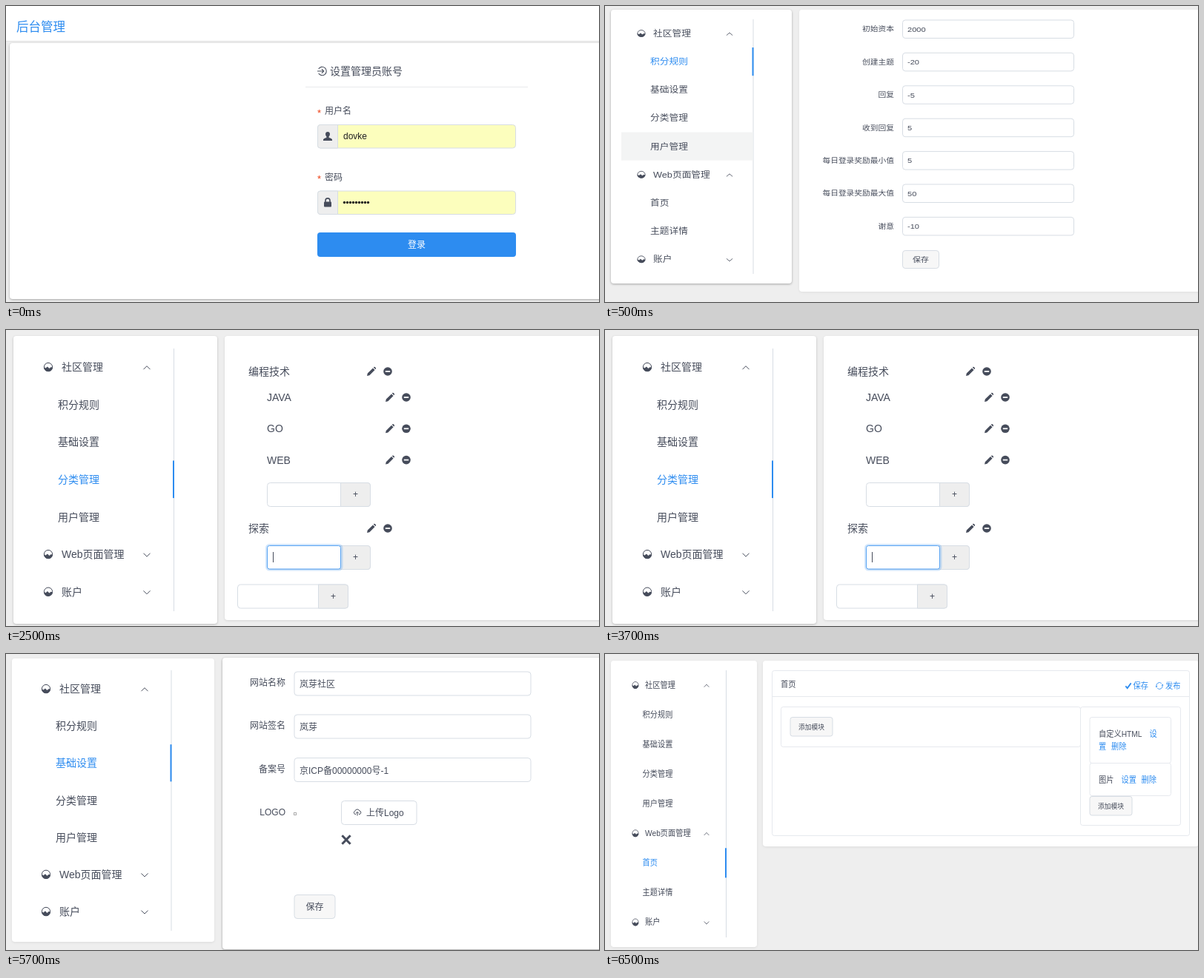
These frames come from a looping animation (800x400 px, 8 s). An HTML page:

```html
<!DOCTYPE html>
<html lang="zh">
<head>
<meta charset="utf-8">
<title>后台管理</title>
<style>
html, body { margin: 0; width: 100%; height: 100%; overflow: hidden; background: #eee; }
svg { display: block; width: 100vw; height: 100vh; }
text { font-family: "Liberation Sans", "Noto Sans CJK SC", "Noto Sans CJK", sans-serif; white-space: pre; }
</style>
</head>
<body>
<svg id="stage" viewBox="0 0 800 400"></svg>
<script>
const BLUE = '#2d8cf0', INK = '#464c5b', EDGE = '#d7dde4', SOFT = '#e6e9ee';

// Drawing kit; kx and ky are the page zoom of a scene.
function kit(kx = 1, ky = 1) {
  const at = (x, y, body) => `<g transform="translate(${x} ${y}) scale(${kx} ${ky})">${body}</g>`;

  const text = (x, y, str, o = {}) => at(x, y,
    `<text y="${(o.size || 14) * 0.365}" font-size="${o.size || 14}" fill="${o.fill || INK}"` +
    ` text-anchor="${o.anchor || 'start'}" font-weight="${o.weight || 400}">${str}</text>`);

  const rect = (x1, y1, x2, y2, fill, extra = '') =>
    `<rect x="${x1}" y="${y1}" width="${x2 - x1}" height="${y2 - y1}" fill="${fill}" ${extra}/>`;

  const box = (x1, y1, x2, y2, fill = '#fff', stroke = EDGE, r = 4) =>
    rect(x1 + .5, y1 + .5, x2 - .5, y2 - .5, fill, `rx="${r * kx}" stroke="${stroke}"`);

  const card = (x1, y1, x2, y2, shade = .2) => rect(x1, y1, x2, y2, '#fff',
    `rx="4" style="filter:drop-shadow(0 1px 1.5px rgba(0,0,0,${shade}))"`);

  const button = (x1, y1, x2, y2, str, fill = '#f7f7f7') => box(x1, y1, x2, y2, fill) +
    text((x1 + x2) / 2, (y1 + y2) / 2, str, { size: 12, anchor: 'middle' });

  const icon = (x, y, name) => at(x, y, icons[name]);

  // Side menu: rows are [label, kind], kind being 'up', 'down', 'on', 'hover' or ''.
  function menu(m) {
    let out = rect(m.line, m.top, m.line + 1, m.bottom, EDGE);
    m.rows.forEach(([label, kind], i) => {
      const y = m.y + i * m.step;
      if (kind === 'up' || kind === 'down') {
        out += icon(m.icon, y, 'gauge') + text(m.head, y, label) + icon(m.arrow, y + .7, kind);
        return;
      }
      if (kind === 'hover') out += rect(22, y - m.step / 2, m.line, y + m.step / 2, '#f3f4f4');
      if (kind === 'on') out += rect(m.line - 1, y - m.step / 2, m.line + 1, y + m.step / 2, BLUE);
      out += text(m.item, y, label, { fill: kind === 'on' ? BLUE : INK });
    });
    return out;
  }
  return { text, rect, box, card, button, icon, menu };
}

const stroke = (d, color = INK, w = 1) =>
  `<path d="${d}" fill="none" stroke="${color}" stroke-width="${w}"/>`;
const solid = (d, color = INK) => `<path d="${d}" fill="${color}"/>`;

const icons = {
  gauge: `<circle r="5.6" fill="#fff" stroke="${INK}"/>` +
    solid('M-6 0L-3.6 1.6L-1 -.6L1.4 2L3.4 .2L6 .6A6 6 0 0 1 -6 0Z'),
  up: stroke('M-4.5 2.5L0 -2L4.5 2.5'),
  down: stroke('M-4.5 -2L0 2.5L4.5 -2'),
  enter: stroke('M-4.8 -3A5.7 5.7 0 1 1 -4.8 3M-6.5 0H2M-.6 -2.8L2.2 0L-.6 2.8', INK, 1.1),
  user: solid('M-6 6V4.2Q-5.5 3 -1.6 1.8V.6Q-3 -1 -3 -3Q-2.8 -6 0 -6T3 -3Q3 -1 1.6 .6V1.8Q5.5 3 6 4.2V6Z'),
  lock: stroke('M-3 0V-2.6A3 3 0 0 1 3 -2.6V0', INK, 1.6) +
    `<rect x="-5" y="-1" width="10" height="7" rx="1" fill="${INK}"/>`,
  pencil: solid('M-6 6L-5.2 2.6L2 -4.6L4.6 -2L-2.6 5.2ZM2.8 -5.4L3.8 -6.2Q4.4 -6.4 6 -4.8Q6.4 -4.2 5.4 -2.8Z'),
  minus: `<circle r="5.8" fill="${INK}"/><path d="M-3.2 0H3.2" stroke="#fff" stroke-width="1.8"/>`,
  cloud: stroke('M-2 2.5H-3A2.3 2.3 0 0 1 -3.2 -1.8A3.3 3.3 0 0 1 3 -2A2.3 2.3 0 0 1 3 2.5H2M0 4.5V-.5M-1.8 1.2L0 -.6L1.8 1.2'),
  cross: stroke('M-5.6 -5.8L5.6 5.8M5.6 -5.8L-5.6 5.8', INK, 3),
  check: stroke('M-5 .5L-1.8 4L5 -4.5', BLUE, 2.4),
  sync: stroke('M-5.6 1A5.6 5.6 0 0 1 3.8 -4M5.6 -1A5.6 5.6 0 0 1 -3.8 4', BLUE, 1.1) +
    solid('M-7.4 .6H-3.6L-5.6 3ZM7.4 -.6H3.6L5.6 -3Z', BLUE)
};

function login() {
  const k = kit();
  const field = (y, label, glyph) =>
    k.text(420, y - 32, '*', { size: 13, fill: '#ed3f14' }) +
    k.text(430, y - 34, label, { size: 12 }) +
    k.box(420, y - 16, 688, y + 16.5, '#fcfebd') +
    `<path d="M447.5 ${y - 15.5}H424a3.5 3.5 0 0 0 -3.5 3.5V${y + 12.5}a3.5 3.5 0 0 0 3.5 3.5H447.5Z" fill="#eee" stroke="${EDGE}"/>` +
    k.icon(434, y, glyph);
  let dots = '';
  for (let i = 0; i < 9; i++) dots += `<circle cx="${456.5 + i * 4}" cy="265.5" r="1.7" fill="#222"/>`;
  return k.rect(0, 0, 800, 47, '#fff') + k.rect(0, 47, 800, 48, '#e4e4e4') +
    k.card(5, 50, 820, 396, .3) +
    k.text(14, 28, '后台管理', { size: 16.5, fill: BLUE, weight: 500 }) +
    k.icon(426.5, 88, 'enter') + k.text(437, 88, '设置管理员账号') +
    k.rect(404, 109, 704, 110, '#e9eaec') +
    field(176, '用户名', 'user') + k.text(455, 176, 'dovke', { size: 12, fill: '#222' }) +
    field(265.5, '密码', 'lock') + dots +
    k.rect(420, 306, 688, 339, BLUE, 'rx="4"') +
    k.text(554, 322.5, '登录', { size: 12, fill: '#fff', anchor: 'middle', weight: 500 });
}

function points() {
  const k = kit(.91, .79);
  const rules = [['初始资本', '2000'], ['创建主题', '-20'], ['回复', '-5'], ['收到回复', '5'],
    ['每日登录奖励最小值', '5'], ['每日登录奖励最大值', '50'], ['谢意', '-10']];
  return k.card(8, 5, 252, 375, .3) + k.card(262, 5, 820, 386, .06) +
    k.menu({
      line: 199.5, top: 18, bottom: 362, y: 37, step: 38.15, icon: 49, head: 65, item: 61, arrow: 168,
      rows: [['社区管理', 'up'], ['积分规则', 'on'], ['基础设置', ''], ['分类管理', ''], ['用户管理', 'hover'],
        ['Web页面管理', 'up'], ['首页', ''], ['主题详情', ''], ['账户', 'down']]
    }) +
    rules.map(([label, value], i) => {
      const y = 31 + i * 44.4;
      return k.text(390, y, label, { size: 11.8, anchor: 'end' }) +
        k.box(401, y - 12.5, 633, y + 13) + k.text(408, y + .3, value, { size: 12.2 });
    }).join('') +
    k.button(401, 330, 451, 355, '保存');
}

function topics() {
  const k = kit();
  const row = (x, y, label) => k.text(x, y, label) + k.icon(x + 166, y, 'pencil') + k.icon(x + 188, y, 'minus');
  const adder = (x, y, w) => k.box(x, y, x + w + 40, y + 33) +
    `<path d="M${x + w - .5} ${y + .5}h36.5a3.5 3.5 0 0 1 3.5 3.5v25a3.5 3.5 0 0 1 -3.5 3.5h-36.5Z" fill="#eee" stroke="${EDGE}"/>` +
    k.text(x + w + 19.5, y + 16, '+', { size: 12, anchor: 'middle' });
  return k.card(10, 8, 285, 397, .22) + k.card(295, 8, 820, 392, .1) +
    k.menu({
      line: 226, top: 25, bottom: 380, y: 50, step: 50.6, icon: 57, head: 75, item: 70, arrow: 190,
      rows: [['社区管理', 'up'], ['积分规则', ''], ['基础设置', ''], ['分类管理', 'on'], ['用户管理', ''],
        ['Web页面管理', 'down'], ['账户', 'down']]
    }) +
    row(327, 56, '编程技术') +
    ['JAVA', 'GO', 'WEB'].map((s, i) => row(352, 91 + i * 42.3, s)).join('') +
    adder(352, 206, 100) +
    row(327, 268, '探索') +
    adder(352, 291, 100) +
    k.rect(351.5, 290.5, 453, 324, 'none', 'rx="4" stroke="#2d8cf0" stroke-opacity=".22" stroke-width="3"') +
    k.box(352, 291, 452, 323.5, '#fff', '#57a3f3', 3) +
    k.rect(360, 300, 361, 314, INK) +
    adder(312, 343.5, 110);
}

function basics() {
  const k = kit();
  const field = (y, label, value) => k.text(377, y, label, { size: 12, anchor: 'end' }) +
    k.box(388.5, y - 15.5, 708.5, y + 17.5) + k.text(396, y + 1.7, value, { size: 12 });
  return k.card(8, 6, 281, 389, .08) + k.card(292, 5, 820, 399, .35) +
    k.menu({
      line: 222.5, top: 22, bottom: 374, y: 47, step: 50.15, icon: 54, head: 72, item: 67, arrow: 187,
      rows: [['社区管理', 'up'], ['积分规则', ''], ['基础设置', 'on'], ['分类管理', ''], ['用户管理', ''],
        ['Web页面管理', 'down'], ['账户', 'down']]
    }) +
    field(39, '网站名称', '岚芽社区') + field(97, '网站签名', '岚芽') +
    field(155.5, '备案号', '京ICP备00000000号-1') +
    k.text(377, 214, 'LOGO', { size: 12, anchor: 'end' }) +
    k.box(388, 214, 392, 218, '#fff', '#aaa', 0) +
    k.box(452, 198, 554.5, 231) + k.icon(474, 214, 'cloud') + k.text(486, 215, '上传Logo', { size: 12 }) +
    k.icon(459, 251, 'cross') +
    k.button(388.5, 325, 444.5, 358, '保存');
}

function home() {
  const k = kit(.73, .8);
  const link = (x, y, str) => k.text(x, y, str, { fill: BLUE });
  const frame = (x1, y1, x2, y2) => k.box(x1, y1, x2, y2, '#fff', SOFT);
  return k.card(8, 9, 205, 396, .07) + k.card(213, 9, 801, 260, .07) +
    k.menu({
      line: 163, top: 22, bottom: 383, y: 42, step: 40.05, icon: 41, head: 54, item: 50.5, arrow: 137,
      rows: [['社区管理', 'up'], ['积分规则', ''], ['基础设置', ''], ['分类管理', ''], ['用户管理', ''],
        ['Web页面管理', 'up'], ['首页', 'on'], ['主题详情', ''], ['账户', 'down']]
    }) +
    frame(225, 22, 789, 246) + k.rect(226, 57, 788, 58, SOFT) +
    k.text(237, 41, '首页') +
    k.icon(706, 43, 'check') + link(712.5, 43, '保存') +
    k.icon(748, 43, 'sync') + link(756, 43, '发布') +
    frame(237, 71, 642, 126) + k.button(249.5, 85, 307.5, 111.5, '添加模块') +
    frame(641, 71, 777, 232) +
    frame(653.5, 85, 764, 148) + k.text(666, 108, '自定义HTML') +
    link(734.5, 108, '设') + link(666, 125, '置') + link(683, 125, '删除') +
    frame(653.5, 147, 764, 192) + k.text(666, 169.5, '图片') +
    link(696.5, 169.5, '设置') + link(723.5, 169.5, '删除') +
    k.button(653.5, 192, 711.5, 218.5, '添加模块');
}

const LOOP = 8000;
const scenes = [[0, login], [500, points], [2500, topics], [4500, basics], [6500, home]];
const stage = document.getElementById('stage');
stage.innerHTML = '<rect width="800" height="400" fill="#eee"/>' +
  scenes.map(([, draw]) => `<g class="scene">${draw()}</g>`).join('');
const groups = stage.querySelectorAll('.scene');

function render(t) {
  const now = scenes.filter(([start]) => start <= t).length - 1;
  groups.forEach((g, i) => { g.style.display = i === now ? '' : 'none'; });
}

const begin = performance.now();
function tick() {
  render((performance.now() - begin) % LOOP);
  requestAnimationFrame(tick);
}
tick();
</script>
</body>
</html>
```
